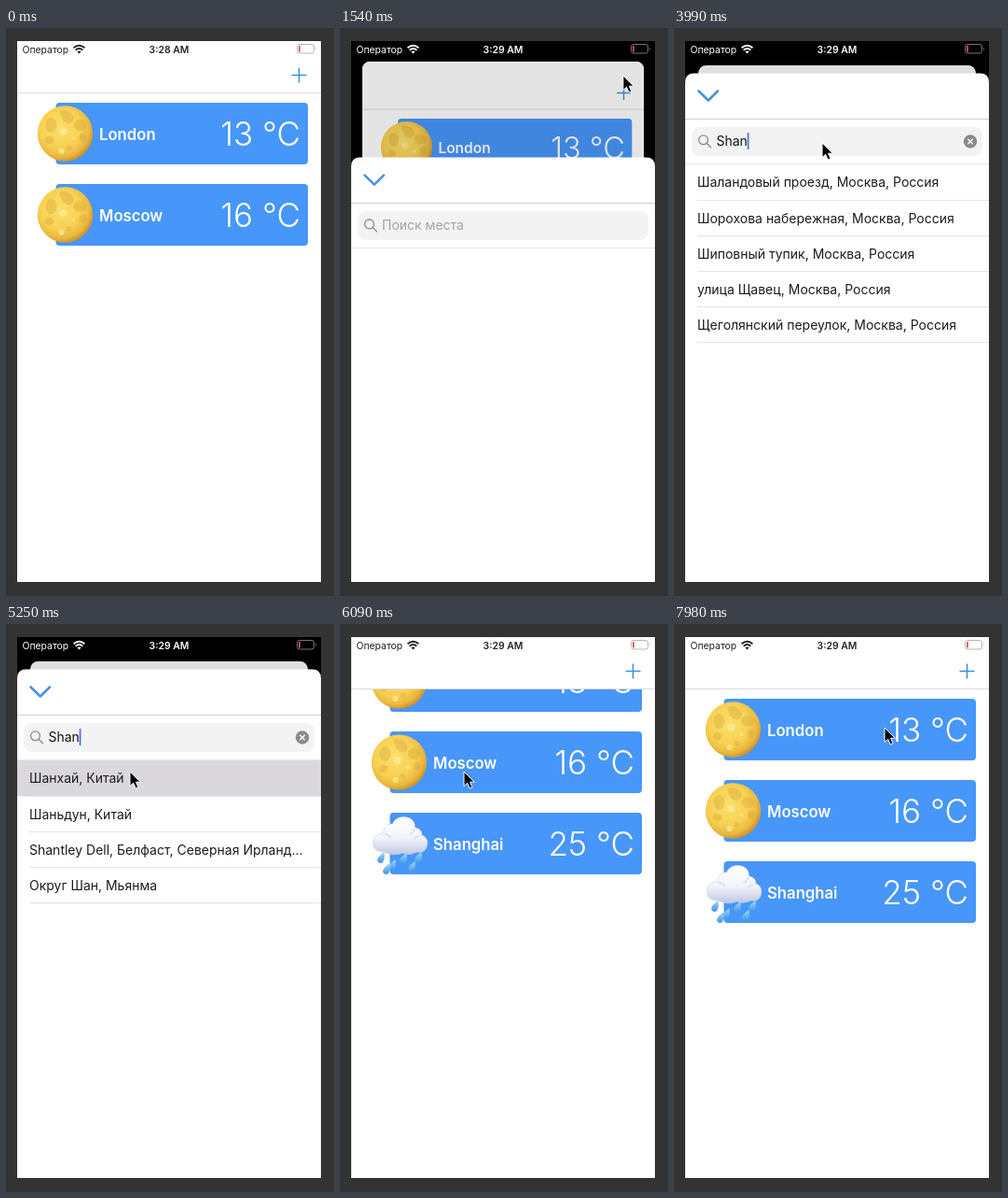
Write an HTML page that moves like this. It is 352 px wide and 608 px high and loops after 8000 ms.

```html
<!DOCTYPE html>
<html lang="ru">
<head>
<meta charset="utf-8">
<title>Weather list</title>
<style>
  html, body { margin: 0; width: 100%; height: 100%; overflow: hidden; background: #333; }
  svg { display: block; width: 352px; height: 608px; font-family: Inter, "Liberation Sans", sans-serif; }
  .city { font-size: 16.7px; font-weight: 600; fill: #fff; }
  .temp { font-size: 35px; font-weight: 300; fill: #fff; text-anchor: end; }
  .row { font-size: 14px; fill: #1c1c1e; }
</style>
</head>
<body>
<svg viewBox="0 0 352 608">
  <defs>
    <clipPath id="screenClip"><rect x="12" y="14" width="326" height="579"/></clipPath>
    <clipPath id="homeClip"><rect id="homeShape" x="12" y="14" width="326" height="579"/></clipPath>
    <clipPath id="listClip"><rect x="12" y="70" width="326" height="523"/></clipPath>
    <radialGradient id="moonFill" cx=".42" cy=".4" r=".62">
      <stop offset="0" stop-color="#fbdf6b"/>
      <stop offset=".6" stop-color="#f7d052"/>
      <stop offset=".85" stop-color="#e9b63f"/>
      <stop offset="1" stop-color="#c98f2c"/>
    </radialGradient>
    <linearGradient id="cloudFill" x1="0" y1="-26" x2="0" y2="11" gradientUnits="userSpaceOnUse">
      <stop offset="0" stop-color="#fff"/>
      <stop offset=".55" stop-color="#f2f3fa"/>
      <stop offset="1" stop-color="#c3c8e2"/>
    </linearGradient>
    <linearGradient id="dropFill" x1="0" y1="0" x2="0" y2="1">
      <stop offset="0" stop-color="#a9d8fb"/>
      <stop offset="1" stop-color="#3f97e2"/>
    </linearGradient>
    <g id="moon">
      <circle r="29.7" fill="url(#moonFill)"/>
      <g fill="#d9a63a" opacity=".38">
        <path d="M-6-24q7-3 12 2t2 9-8 1-6-12z"/>
        <ellipse cx="16" cy="-9" rx="7" ry="6"/>
        <ellipse cx="-15" cy="-9" rx="6" ry="8"/>
        <ellipse cx="19" cy="4" rx="4" ry="5"/>
        <ellipse cx="-17" cy="7" rx="5" ry="4"/>
        <circle cx="4" cy="15" r="3"/>
      </g>
      <g fill="#fff0a0" opacity=".6">
        <circle cx="-4" cy="19" r="3"/><circle cx="-2" cy="-2" r="4"/><circle cx="9" cy="5" r="2"/>
      </g>
    </g>
    <path id="drop" d="M3-6Q4 1 2 4A3.2 3.2 0 0 1-4 1Q-3-2 3-6z" fill="url(#dropFill)"/>
    <g id="rain">
      <g fill="url(#cloudFill)" stroke="#cfd3e8" stroke-width=".6">
        <path d="M-18 9C-27 9-30 3-29-3-28-9-22-12-18-11-18-19-12-22-8-21-6-27 1-30 8-28 14-26 16-22 16-17 22-16 24-12 23-9 28-8 30-3 29 2 28 8 23 10 18 9Q10 13 3 10-6 14-18 9z"/>
      </g>
      <g fill="none" stroke="#d5d8ea" stroke-width="2" opacity=".7">
        <path d="M-17-10q5 0 7 4M15-16q-1 5-5 6M21-8q-4 0-6 3"/>
      </g>
      <use href="#drop" x="-20" y="15"/><use href="#drop" x="-8" y="23"/><use href="#drop" x="4" y="16"/>
      <use href="#drop" x="20" y="15"/><use href="#drop" x="13" y="25"/><use href="#drop" x="-14" y="27"/>
    </g>
  </defs>

  <rect width="352" height="608" fill="#333"/>
  <g clip-path="url(#screenClip)">
    <rect x="12" y="14" width="326" height="579"/>
    <g id="home">
      <g clip-path="url(#homeClip)">
        <rect x="12" y="14" width="326" height="579" fill="#fff"/>
        <g clip-path="url(#listClip)"><g id="cards"></g></g>
        <path d="M12 69.5H338" stroke="#dcdcdc"/>
        <path d="M306.5 50.5H322.5M314.5 42.5V58.5" stroke="#3b93e0" stroke-width="1.6"/>
        <rect id="dim" x="12" y="14" width="326" height="579"/>
      </g>
    </g>

    <g id="sheet">
      <path d="M12 610V58Q12 48.500 21.500 48.500H328.500Q338 48.500 338 58V610z" fill="#fff"/>
      <path d="M26.500 67.500L36.800 77.500 47 67.500" fill="none" stroke="#4a92de" stroke-width="2.600" stroke-linecap="round" stroke-linejoin="round"/>
      <path d="M12 97.500H338" stroke="#cfcfcf"/>
      <rect x="19" y="106" width="312" height="31" rx="8.500" fill="#f3f3f4"/>
      <path d="M12 145.500H338" stroke="#e6e6e6"/>
      <g fill="none" stroke="#88888c" stroke-width="1.300" stroke-linecap="round">
        <circle cx="31.500" cy="119.800" r="4.900"/><path d="M35.200 123.500L39.500 127.800"/>
      </g>
      <text id="placeholder" x="45" y="126" font-size="14" fill="#a3a3a7">Поиск места</text>
      <text id="query" x="45.500" y="126" font-size="14" fill="#111"></text>
      <rect id="caret" y="112" width="1.700" height="18" fill="#4a70e4"/>
      <g id="clear">
        <circle cx="318" cy="121.500" r="7.200" fill="#8b8b8f"/>
        <path d="M315.300 118.800l5.400 5.400m0-5.400l-5.400 5.400" stroke="#fff" stroke-width="1.300"/>
      </g>
      <rect id="highlight" x="12" y="146" width="326" height="38.500" fill="#dad8dd"/>
      <g id="streets"></g>
      <g id="places"></g>
    </g>

    <g id="status">
      <text x="17.500" y="27" font-size="10.400">Оператор</text>
      <text x="175" y="27" font-size="10.400" font-weight="600" text-anchor="middle" id="clock"></text>
      <g fill="none" stroke="currentColor" stroke-width="1.900">
        <path d="M72.600 21.300Q78.500 16.300 84.400 21.300M74.700 23.700Q78.500 20.500 82.300 23.700"/>
      </g>
      <path d="M76.400 25.300Q78.500 23.700 80.600 25.300L78.500 27.600z"/>
      <rect x="312.500" y="17.500" width="18" height="9.500" rx="2.500" fill="none" stroke="#b5b5b7" id="battery"/>
      <path d="M332 20.500q1.500 1.700 0 3.500z" fill="#b5b5b7"/>
      <rect x="314" y="19" width="1.800" height="6.500" rx=".6" fill="#ef5148"/>
    </g>
  </g>
  <path id="cursor" d="M0 0V15.500L3.700 12.200 6.200 18 9 16.800 6.500 11.200H11.300z" stroke="#fff" stroke-width="1" stroke-linejoin="round"/>
</svg>
<script>
const LOOP = 8000;
const $ = id => document.getElementById(id);
const show = (id, on) => $(id).setAttribute('visibility', on ? 'visible' : 'hidden');

const cities = [['London', 13, 'moon'], ['Moscow', 16, 'moon'], ['Shanghai', 25, 'rain']];
$('cards').innerHTML = cities.map(([name, degrees, icon], i) => `
  <g id="card${i}" transform="translate(0 ${80 + 87 * i})">
    <rect x="53.500" width="270.500" height="66" rx="4" fill="#4796f9"/>
    <use href="#${icon}" x="${icon === 'moon' ? 63.5 : 64.5}" y="33"/>
    <text class="city" x="100" y="39.500">${name}</text>
    <text class="temp" x="316" y="46">${degrees} °C</text>
  </g>`).join('');

const rows = list => list.map((label, i) => {
  const y = 146 + 38.2 * i;
  return `<text class="row" x="25" y="${y + 24.3}">${label}</text>
    <path d="M25 ${Math.floor(y + 38) + .5}H338" stroke="#e4e4e6"/>`;
}).join('');
$('streets').innerHTML = rows(['Шаландовый проезд', 'Шорохова набережная', 'Шиповный тупик',
  'улица Щавец', 'Щеголянский переулок'].map(s => s + ', Москва, Россия'));
$('places').innerHTML = rows(['Шанхай, Китай', 'Шаньдун, Китай',
  'Shantley Dell, Белфаст, Северная Ирланд…', 'Округ Шан, Мьянма']);

const typed = [[3150, 'S'], [3430, 'Sh'], [3570, 'Sha'], [3710, 'Shan']];

// time, x, y of the pointer tip
const path = [
  [490, 205, 505], [700, 245, 330], [900, 300, 120], [1050, 321, 56], [1120, 323, 46],
  [1400, 323, 46], [1680, 285, 56], [1960, 195, 87], [2100, 168, 109], [2240, 159, 123],
  [4340, 159, 123], [4600, 143, 145], [4900, 133, 158], [6860, 133, 158],
  [7250, 150, 225], [7600, 165, 275], [7700, 172, 270], [7910, 223, 118], [7980, 226, 111]
];

const clamp = u => Math.min(1, Math.max(0, u));
const smooth = u => (u = clamp(u), u * u * (3 - 2 * u));
const spring = (ms, tau = 65) => ms <= 0 ? 0 : 1 - (1 + ms / tau) * Math.exp(-ms / tau);

function pointer(t) {
  const next = path.findIndex(p => p[0] > t);
  if (next < 0) return path[path.length - 1].slice(1);
  const [t0, x0, y0] = path[Math.max(0, next - 1)], [t1, x1, y1] = path[next];
  const u = clamp((t - t0) / (t1 - t0));
  return [x0 + (x1 - x0) * u, y0 + (y1 - y0) * u];
}

function drawHome(t, open) {
  $('home').setAttribute('transform',
    `translate(175 ${14 + 26 * open}) scale(${1 - .086 * open}) translate(-175 -14)`);
  $('homeShape').setAttribute('rx', 9 * Math.min(1, open * 4));
  $('dim').setAttribute('opacity', .125 * open);
  show('card2', t >= 5480);
  const scroll = t < 5480 ? 0 : -54 * (1 - smooth((t - 6020) / 600));
  $('cards').setAttribute('transform', `translate(0 ${scroll})`);
}

function drawSheet(t, open) {
  show('sheet', open > 0);
  $('sheet').setAttribute('transform', `translate(0 ${545 * (1 - open)})`);
  const query = typed.reduce((text, [at, s]) => t >= at ? s : text, '');
  $('query').textContent = query;
  show('placeholder', !query);
  show('clear', query);
  const width = query ? $('query').getComputedTextLength() : 0;
  $('caret').setAttribute('x', 45.3 + width);
  show('caret', t >= 2520 && !(t >= 4410 && t < 4830));
  show('highlight', t >= 5180);
  $('streets').setAttribute('display', t >= 3990 && t < 4200 ? 'inline' : 'none');
  $('places').setAttribute('display', t >= 4200 ? 'inline' : 'none');
}

function drawStatus(t, open) {
  const ink = open > .5 ? '#fff' : '#222';
  $('status').setAttribute('fill', ink);
  $('status').setAttribute('color', ink);
  $('battery').setAttribute('stroke', open > .5 ? '#77777a' : '#b5b5b7');
  $('clock').textContent = t < 1540 ? '3:28 AM' : '3:29 AM';
}

function draw(t) {
  const open = t < 5480 ? spring(t - 1330) : t < 6160 ? 1 - spring(t - 5480) : 0;
  drawHome(t, open);
  drawSheet(t, open);
  drawStatus(t, open);
  show('cursor', t >= 490);
  $('cursor').setAttribute('transform', `translate(${pointer(t)})`);
}

function tick() {
  draw(performance.now() % LOOP);
  requestAnimationFrame(tick);
}
tick();
</script>
</body>
</html>
```
